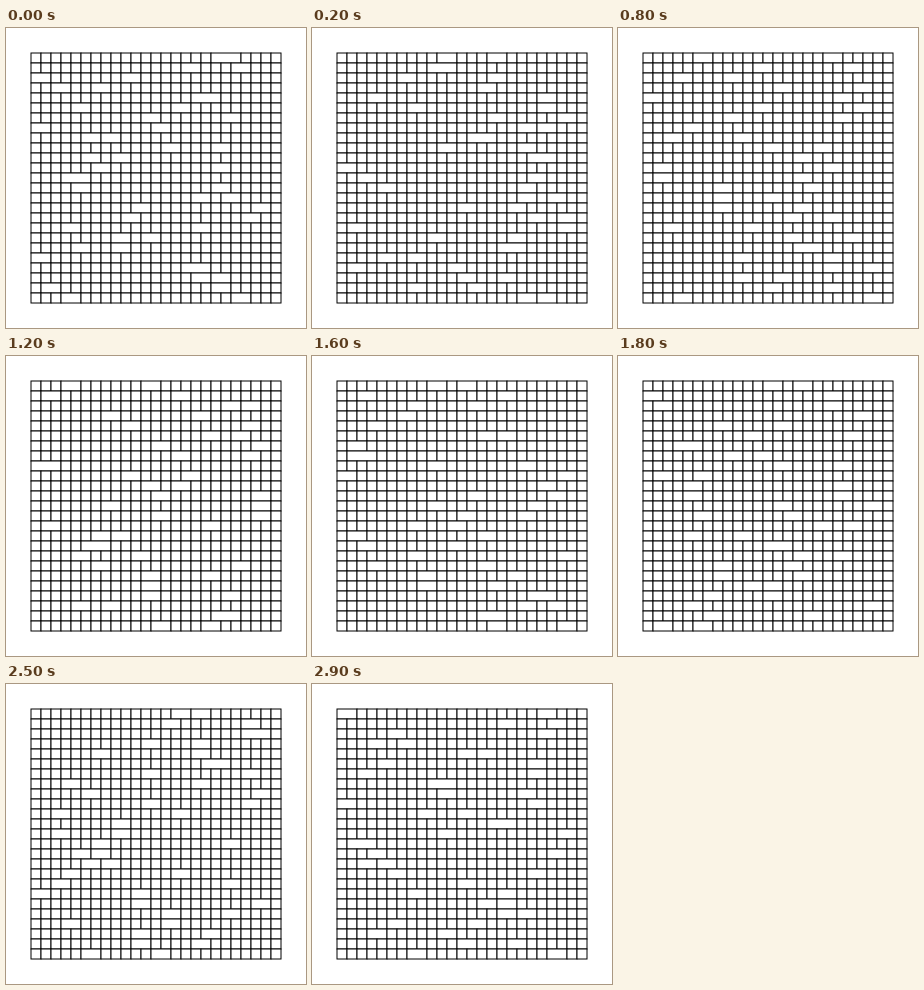
An HTML page with a canvas for the animation above (3 s loop, 300x300 px).

```html
<!DOCTYPE html>
<html lang="en">
<head>
<meta charset="utf-8">
<title>Shuffling grid</title>
<style>
  html, body { margin: 0; width: 100%; height: 100%; overflow: hidden; background: #fff; }
  canvas { display: block; width: 300px; height: 300px; }
</style>
</head>
<body>
<canvas id="stage" width="300" height="300"></canvas>
<script>
const ctx = document.getElementById('stage').getContext('2d');
const COUNT = 25, CELL = 10, EDGE = 25;
const STEP = 100, STEPS = 30, GAPS = 2;

function seeded(seed) {
  return () => {
    seed = (seed + 0x6D2B79F5) | 0;
    let n = Math.imul(seed ^ (seed >>> 15), seed | 1);
    n ^= n + Math.imul(n ^ (n >>> 7), n | 61);
    return ((n ^ (n >>> 14)) >>> 0) / 4294967296;
  };
}

// Each brick's fill covers half of its neighbours' outline, keeping lines thin.
function drawBrick(x, y, width) {
  ctx.fillRect(x, y, width, CELL);
  ctx.strokeRect(x, y, width, CELL);
}

// Each row loses a few dividers; the last divider always stays.
function drawRow(row, random) {
  const open = new Set();
  for (let i = 0; i < GAPS; i++) open.add(1 + Math.floor(random() * (COUNT - 2)));
  let start = 0;
  for (let col = 1; col <= COUNT; col++) {
    if (open.has(col)) continue;
    drawBrick(EDGE + start * CELL, EDGE + row * CELL, (col - start) * CELL);
    start = col;
  }
}

function draw(step) {
  const random = seeded(1000 + step * 77);
  ctx.fillStyle = '#fff';
  ctx.fillRect(0, 0, 300, 300);
  ctx.strokeStyle = '#000';
  ctx.lineWidth = 1;
  for (let row = 0; row < COUNT; row++) drawRow(row, random);
}

let shown = -1;
function tick() {
  const step = Math.floor(performance.now() / STEP) % STEPS;
  if (step !== shown) draw(shown = step);
  requestAnimationFrame(tick);
}
tick();
</script>
</body>
</html>
```
